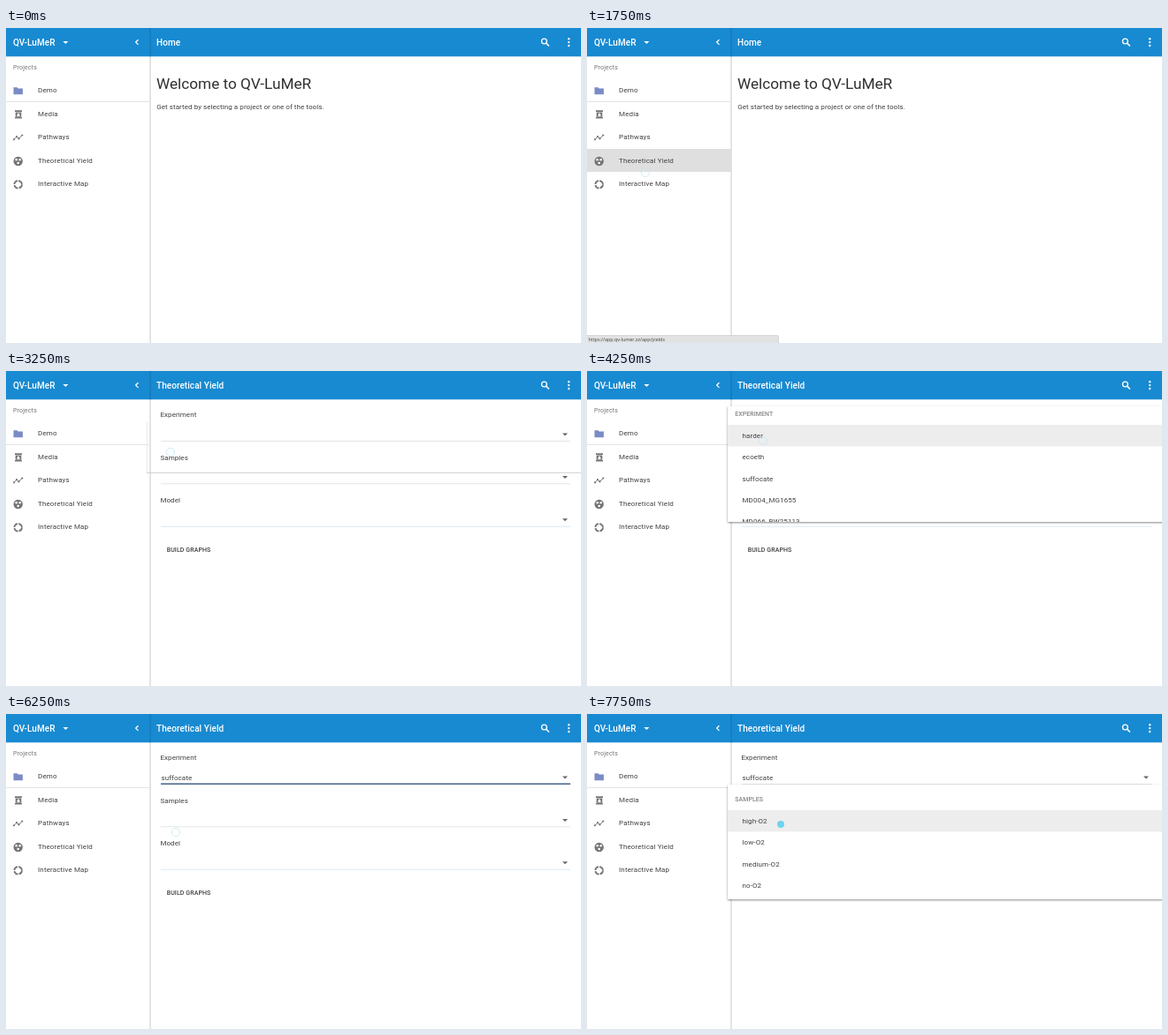
These frames come from a looping animation (650 px wide and 357 px high, 8 s). An HTML page:

```html
<!DOCTYPE html>
<html lang="en">
<head>
<meta charset="utf-8">
<title>Yield tool demo</title>
<style>
  html, body { margin: 0; width: 100%; height: 100%; overflow: hidden; background: #fff; }
  svg { display: block; width: 650px; height: 357px; font: 8px Roboto, sans-serif; }
  text { white-space: pre; }
  .menu { filter: drop-shadow(0 1px 1px #0007); }
</style>
</head>
<body>
<svg id="stage" viewBox="0 0 650 357"></svg>
<script>
const STEP = 250, LOOP = 8000, ROW = 26.5, ITEM = 24.4;
const BLUE = '#188ad1', INK = '#404040', GREY = '#757575', CYAN = '#5fcff0';
const BRAND = 'QV-LuMeR';
const stage = document.getElementById('stage');

const text = (x, y, s, { size = 8, fill = INK, weight = 400, gap = .08, more = '' } = {}) =>
  `<text x="${x}" y="${y}" font-size="${size}" fill="${fill}" font-weight="${weight}" letter-spacing="${gap}" ${more}>${s}</text>`;
const rect = (x, y, w, h, fill, more = '') =>
  `<rect x="${x}" y="${y}" width="${w}" height="${h}" fill="${fill}" ${more}/>`;
const dot = (x, y, r, fill, more = '') =>
  `<circle cx="${x}" cy="${y}" r="${r}" fill="${fill}" ${more}/>`;
const path = (d, fill, more = '') => `<path d="${d}" fill="${fill}" ${more}/>`;
const stroke = (color, width) => `stroke="${color}" stroke-width="${width}"`;
const caret = (x, y, fill) => path(`M${x - 3} ${y}h6l-3 3z`, fill);

// Pointer keys: start time, x, y, pressed
const pointer = [
  [250, 263, 12], [500, 113, 119], [1000, 95, 135], [1250, 75, 158],
  [1500, 66, 164], [2000, 66, 164, 1], [2250, 66, 164], [2750, 120, 132],
  [3000, 186, 92, 1], [3250, 186, 92], [3750, 192, 85], [4000, 199, 79],
  [5250, 198, 98], [5500, 194, 122], [5750, 194, 124, 1], [6000, 192, 134],
  [6500, 196, 129], [6750, 200, 124, 1], [7000, 203, 129], [7250, 206, 133],
  [7500, 208.5, 135.5], [7750, 219, 125, 1]
];

// Ripple keys: time -> radius, opacity
const ripple = { 2000: [45, .1], 2250: [90, .1], 2500: [110, .05] };

const menus = {
  experiment: {
    title: 'EXPERIMENT', top: 40, titleY: 50.8, first: 61, bottom: 171,
    items: ['harder', 'ecoeth', 'suffocate', 'MD004_MG1655', 'MD066_BW25113']
  },
  samples: {
    title: 'SAMPLES', top: 80, titleY: 99.3, first: 109, bottom: 210,
    items: ['high-O2', 'low-O2', 'medium-O2', 'no-O2']
  }
};

function icons() {
  const timeline = [[9, 126.3], [12, 123.2], [14.5, 125.4], [18.3, 121.5]];
  return path('M8.5 67.2h4l1.2 1.2h5.2v6.8h-10.4z', '#7b8bc6')
    + path('M10 93.2h8v1.7h-8zM10.7 95.5h6.6v5.2h-6.6zM10 101h8v1.6h-8z', GREY)
    + path('M14 96l1.4 2.1a1.5 1.5 0 1 1-2.8 0z', '#fff')
    + `<polyline points="${timeline.join(' ')}" fill="none" ${stroke(GREY, 1)}/>`
    + timeline.map(([x, y]) => dot(x, y, 1.1, GREY)).join('')
    + dot(13.7, 151, 5.2, GREY)
    + [[11.7, 149.3], [15.7, 149.3], [13.7, 153]].map(([x, y]) => dot(x, y, 1.3, '#fff')).join('')
    + dot(13.7, 177.3, 4.3, 'none', stroke(GREY, 1.8) + ' stroke-dasharray="5.6 1.15"');
}

function sidebar(t) {
  const hovered = t >= 1250 && t < 2750;
  const wave = ripple[t];
  let s = rect(0, 32, 163, 325, '#fff');
  if (hovered) s += rect(0, 137, 162.5, 26, t < 1500 ? '#ececec' : '#dfdfdf');
  if (wave) s += `<clipPath id="row">${rect(0, 137, 162.5, 26, '#000')}</clipPath>`
    + dot(66, 164, wave[0], '#000', `opacity="${wave[1]}" clip-path="url(#row)"`);
  s += text(8, 47.3, 'Projects', { size: 7, fill: GREY, gap: .17 })
    + rect(0, 83, 162, .8, '#dedede') + icons();
  ['Demo', 'Media', 'Pathways', 'Theoretical Yield', 'Interactive Map'].forEach((name, i) =>
    s += text(36, 73 + i * ROW, name, { gap: .15 }));
  return s + rect(162.4, 32, 1.2, 325, '#d2d2d2');
}

function header(t) {
  const white = { size: 10, fill: '#fff', weight: 500, gap: .06 };
  return rect(0, 0, 650, 32.3, BLUE) + rect(162.5, 0, 1, 32.3, '#1473b0')
    + text(8, 19.8, BRAND, white) + caret(67.4, 15, '#fff')
    + path('M149.5 13.3l-2.8 2.8 2.8 2.8', 'none', stroke('#fff', 1.3))
    + text(170, 19.8, t < 2250 ? 'Home' : 'Theoretical Yield', white)
    + dot(608.4, 15, 2.9, 'none', stroke('#fff', 1.3))
    + path('M610.5 17.1l3.4 3.4', 'none', stroke('#fff', 1.6))
    + [12.2, 16.1, 20].map(y => dot(636.2, y, 1.2, '#fff')).join('');
}

function home() {
  return text(170, 69, 'Welcome to ' + BRAND, { size: 17.2, fill: '#303030', gap: 0 })
    + text(170.3, 92, 'Get started by selecting a project or one of the tools.', { gap: .06 });
}

function form(t) {
  const chosen = t >= 6000, focused = chosen && t < 6750;
  let s = '';
  ['Experiment', 'Samples', 'Model'].forEach((name, i) => {
    const y = i * 48.4, active = !i && focused;
    s += text(174.4, 52.3 + y, name) + caret(632, 70.5 + y, '#666')
      + rect(175, (active ? 78.5 : 79) + y, 463, active ? 1.4 : .8,
        active ? '#36587f' : i === 2 ? '#cfe7f3' : '#dedede');
  });
  if (chosen) s += text(175.5, 75.2, 'suffocate');
  return s + text(181.7, 204.5, 'BUILD GRAPHS', { size: 7, weight: 500, gap: .1 });
}

function menu({ title, top, titleY, first, bottom, items }, opacity, lit) {
  let s = rect(159, top, 500, bottom - top, '#fff')
    + text(167.3, titleY, title, { size: 7, weight: 500, fill: '#858585', gap: .05 });
  items.forEach((name, i) => {
    const y = first + i * ITEM;
    if (lit.includes(i)) s += rect(159, y, 500, ITEM, '#ededed');
    s += text(175.5, y + 14.7, name, { gap: .1 });
  });
  return `<clipPath id="sheet">${rect(159, top, 500, bottom - top, '#000')}</clipPath>
    <g class="menu" opacity="${opacity}"><g clip-path="url(#sheet)">${s}</g></g>`;
}

function openMenu(t) {
  if (t === 3250) return rect(159, 58, .7, 57, '#d5e6ef') + rect(159, 114.8, 491, .8, '#c4c4c4');
  if (t >= 3500 && t < 6250) {
    const lit = t < 5250 ? [0] : t < 5500 ? [0, 1] : [0, 2];
    return menu(menus.experiment, t === 3500 ? .8 : t === 6000 ? .4 : 1, lit);
  }
  return t >= 7000 ? menu(menus.samples, t === 7000 ? .6 : 1, [0]) : '';
}

function status(t) {
  if (t < 1250 || t >= 2750) return '';
  return rect(-2, 348.5, 218.5, 12, '#e2e2e2', `rx="1.5" ${stroke('#c4c4c4', .6)}`)
    + text(1.5, 354.8, 'https://app.qv-lumer.zz/app/yields',
      { size: 5.4, gap: 0, more: 'font-family="Open Sans, sans-serif"' });
}

function cursor(t) {
  const key = pointer.filter(k => k[0] <= t).pop();
  if (!key) return '';
  const [, x, y, pressed] = key;
  return pressed ? dot(x, y, 4, CYAN, 'opacity=".9"') : dot(x, y, 4.6, 'none', stroke('#c3e7f3', .8));
}

function draw(t) {
  stage.innerHTML = (t < 2250 ? home() : form(t)) + sidebar(t) + header(t)
    + openMenu(t) + status(t) + cursor(t);
}

let shown = -1;
function tick(now) {
  const t = Math.floor(now % LOOP / STEP) * STEP;
  if (t !== shown) draw(shown = t);
  requestAnimationFrame(tick);
}
tick(performance.now());
</script>
</body>
</html>
```
